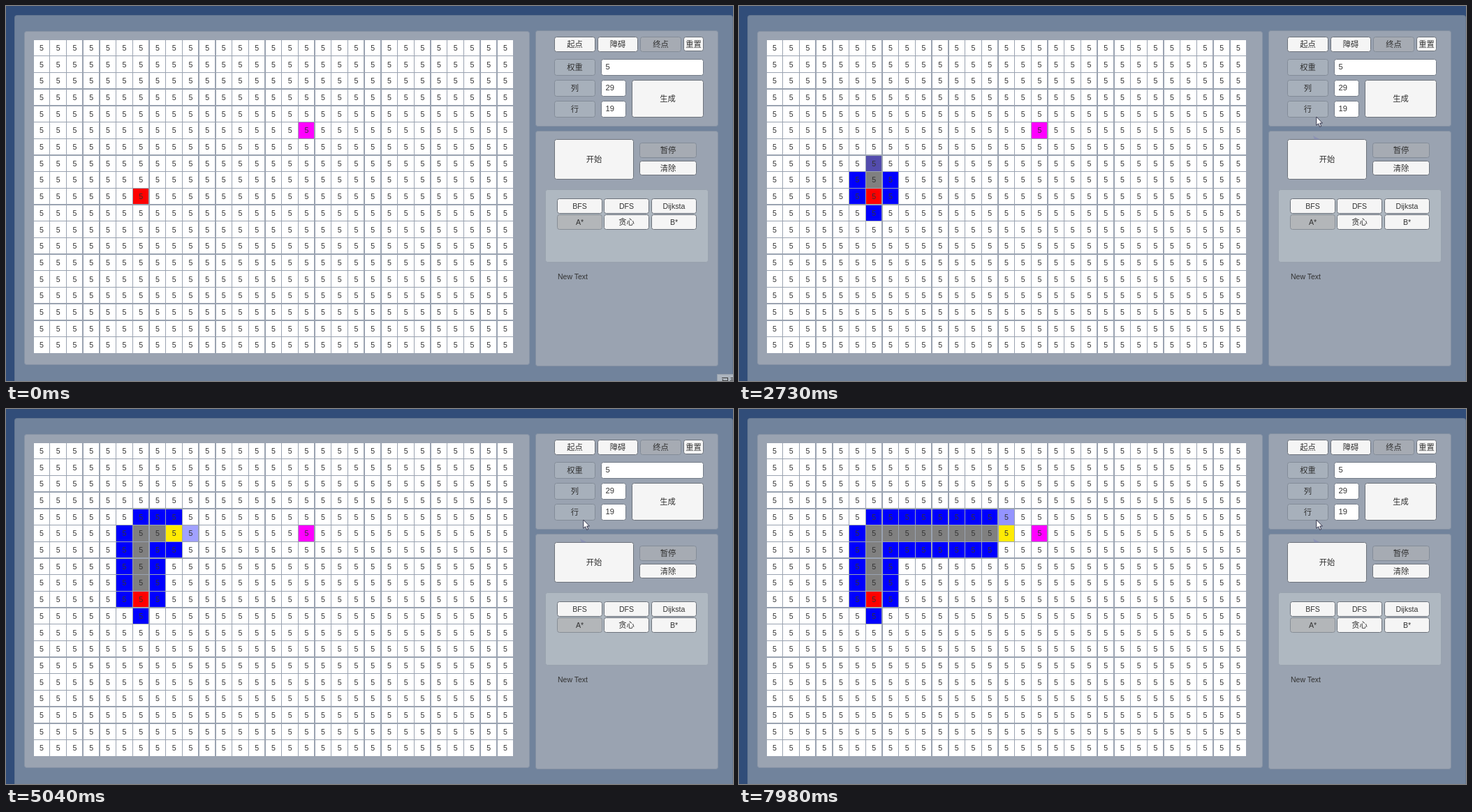
Recreate the animation shown at these times as an HTML page. Size 1041 by 538 pixels, loop 8000 ms.

```html
<!DOCTYPE html>
<html lang="zh-CN">
<head>
<meta charset="utf-8">
<title>Grid pathfinding</title>
<style>
html, body { margin: 0; width: 100%; height: 100%; overflow: hidden; background: #314d79; }
svg { display: block; width: 1041px; height: 538px; }
text { font: 10.6px "Liberation Sans", "Noto Sans CJK SC", "Noto Sans CJK", sans-serif; fill: #323232; }
.cell { shape-rendering: crispEdges; }
</style>
</head>
<body>
<svg id="stage" viewBox="0 0 1041 538"></svg>
<script>
const LOOP = 8000, STEP = 70;
const COLS = 29, ROWS = 19;
const SEARCH_START = 1752.7, TWEEN = 104.8;
const WHITE = [255, 255, 255], BLUE = [0, 0, 255], YELLOW = [255, 235, 4], GRAY = [128, 128, 128];
const RED = [255, 0, 0], MAGENTA = [255, 0, 255];
const stage = document.getElementById('stage');

function add(tag, attrs, content) {
  const el = document.createElementNS('http://www.w3.org/2000/svg', tag);
  for (const key in attrs) el.setAttribute(key, attrs[key]);
  if (content) el.textContent = content;
  stage.appendChild(el);
  return el;
}

function box(x, y, right, bottom, fill, stroke, rx = 3) {
  return add('rect', {
    x: x + .5, y: y + .5, width: right - x - 1, height: bottom - y - 1, rx, fill, stroke
  });
}

function label(str, x, y, anchor = 'middle', size = 10.6) {
  return add('text', { x, y: y + size * .36, 'text-anchor': anchor, style: `font-size:${size}px` }, str);
}

function button(str, x, y, right, bottom, fill = '#f5f5f5', stroke = '#6c727b') {
  const el = box(x, y, right, bottom, fill, stroke);
  const size = /[^\x00-\x7f]/.test(str) ? 11.3 : 10.6;
  label(str, (x + right) / 2, (y + bottom) / 2, 'middle', size);
  return el;
}

function input(str, x, y, right, bottom) {
  box(x, y, right, bottom, '#fff', '#737b87');
  label(str, x + 6.5, (y + bottom) / 2 - .7, 'start', 11.2);
}

// Panels
box(12, 13, 1041, 560, '#71839c', '#667891');
box(26, 36, 750, 515, '#9aa3b1', '#8793a5');
box(758, 35, 1020, 173, '#9aa3b1', '#8490a2');
box(758, 179, 1020, 517, '#9aa3b1', '#8490a2');
box(772, 263, 1006, 368, '#afb8c1', '#98a2ae');

// Grid
const cells = [];
for (let r = 0; r < ROWS; r++) {
  for (let c = 0; c < COLS; c++) {
    const x = 39.7 + 23.71 * c, y = 48.8 + 23.69 * r;
    cells.push(add('rect', { class: 'cell', x, y, width: 22.3, height: 22.3 }));
    label('5', x + 11.3, y + 11.3);
  }
}

// Controls
const OFF = '#a6abb3', TAG = '#a7b0bb', EDGE = '#838c98';
button('起点', 785, 44, 844, 66);
button('障碍', 847, 44, 905, 66);
button('终点', 908, 44, 967, 66, OFF, EDGE);
button('重置', 970, 44, 999, 65);
button('权重', 785, 76, 844, 100, TAG, EDGE);
button('列', 785, 106, 844, 130, TAG, EDGE);
button('行', 785, 136, 844, 160, TAG, EDGE);
input('5', 852, 76, 999, 100);
input('29', 852, 106, 888, 130);
input('19', 852, 136, 888, 160);
button('生成', 896, 106, 999, 160);
const startButton = button('开始', 785, 191, 899, 249);
button('暂停', 907, 196, 989, 218, OFF, EDGE);
button('清除', 907, 222, 989, 243);
['BFS', 'DFS', 'Dijksta', 'A*', '贪心', 'B*'].forEach((name, i) => {
  const x = 789 + 67.5 * (i % 3) | 0, y = i < 3 ? 276 : 299;
  const args = name === 'A*' ? ['#b3b6b9', '#878e96'] : [];
  button(name, x, y, x + 65, y + 22, ...args);
});
label('New Text', 790, 388, 'start', 10.5);

// Corner hint, trail and pointer
const hint = [
  box(1018, 528, 1060, 560, '#adb5bf', '#98a2ae', 0),
  label('已录制', 1024, 539, 'start', 12)
];
const trail = add('path', { d: 'M822 186L832 191.5H824Z', fill: '#7f80bb', opacity: .45 });
const pointer = add('path', {
  d: 'M0 0V12.2L2.8 9.7L4.8 14.3L6.9 13.4L4.9 9H8.6Z',
  fill: '#fff', stroke: '#25253f', 'stroke-width': .9
});

// Search schedule: one colour tween after another
const path = [[6, 9], [6, 8], [6, 7], [6, 6]];
for (let c = 6; c <= 14; c++) path.push([c, 5]);
const at = (c, r) => r * COLS + c;
const startCell = at(6, 9), goalCell = at(16, 5);
const seen = new Set([startCell]);
const tweens = [];
path.forEach(([c, r], i) => {
  if (i) tweens.push([at(c, r), BLUE, YELLOW]);
  for (const n of [at(c, r - 1), at(c - 1, r), at(c, r + 1), at(c + 1, r)]) {
    if (seen.has(n)) continue;
    seen.add(n);
    tweens.push([n, WHITE, BLUE]);
  }
  if (i) tweens.push([at(c, r), YELLOW, GRAY]);
});

const mix = (a, b, f) => a.map((v, i) => v + (b[i] - v) * f);

// Rows of [time, ...values], linear between rows
function sample(rows, t) {
  let i = 0;
  while (i < rows.length - 1 && rows[i + 1][0] <= t) i++;
  const a = rows[i], b = rows[i + 1] || a;
  const f = b === a ? 0 : Math.max(0, (t - a[0]) / (b[0] - a[0]));
  return mix(a, b, f).slice(1);
}

const pointerPath = [
  [70, 1035, 530], [300, 960, 420], [550, 866, 290], [830, 828.5, 237], [900, 828.3, 236],
  [1960, 828.3, 236], [2240, 822, 187], [2380, 827, 164], [2450, 826.8, 159]
];
const buttonShade = [
  [1540, 245], [1680, 200], [1750, 200], [1890, 235], [2240, 235], [2310, 245]
];

const show = (el, on) => el.setAttribute('visibility', on ? 'visible' : 'hidden');
const paint = (el, rgb) => el.setAttribute('fill', `rgb(${rgb.map(Math.round)})`);

function draw(t) {
  const colors = cells.map(() => WHITE);
  colors[startCell] = RED;
  colors[goalCell] = MAGENTA;
  const k = (t - SEARCH_START) / TWEEN;
  tweens.forEach(([cell, from, to], i) => {
    if (k > i) colors[cell] = mix(from, to, Math.min(1, k - i));
  });
  cells.forEach((el, i) => paint(el, colors[i]));

  const [shade] = sample(buttonShade, t);
  paint(startButton, [shade, shade, shade]);
  const [x, y] = sample(pointerPath, t);
  pointer.setAttribute('transform', `translate(${x} ${y})`);
  show(pointer, t >= 70);
  show(trail, t >= 2310);
  hint.forEach(el => show(el, t < 70));
}

const began = performance.now();
let shown = -1;
function tick() {
  const t = (performance.now() - began) % LOOP;
  const held = Math.floor(t / STEP) * STEP;
  if (held !== shown) draw(shown = held);
  requestAnimationFrame(tick);
}
tick();
</script>
</body>
</html>
```
